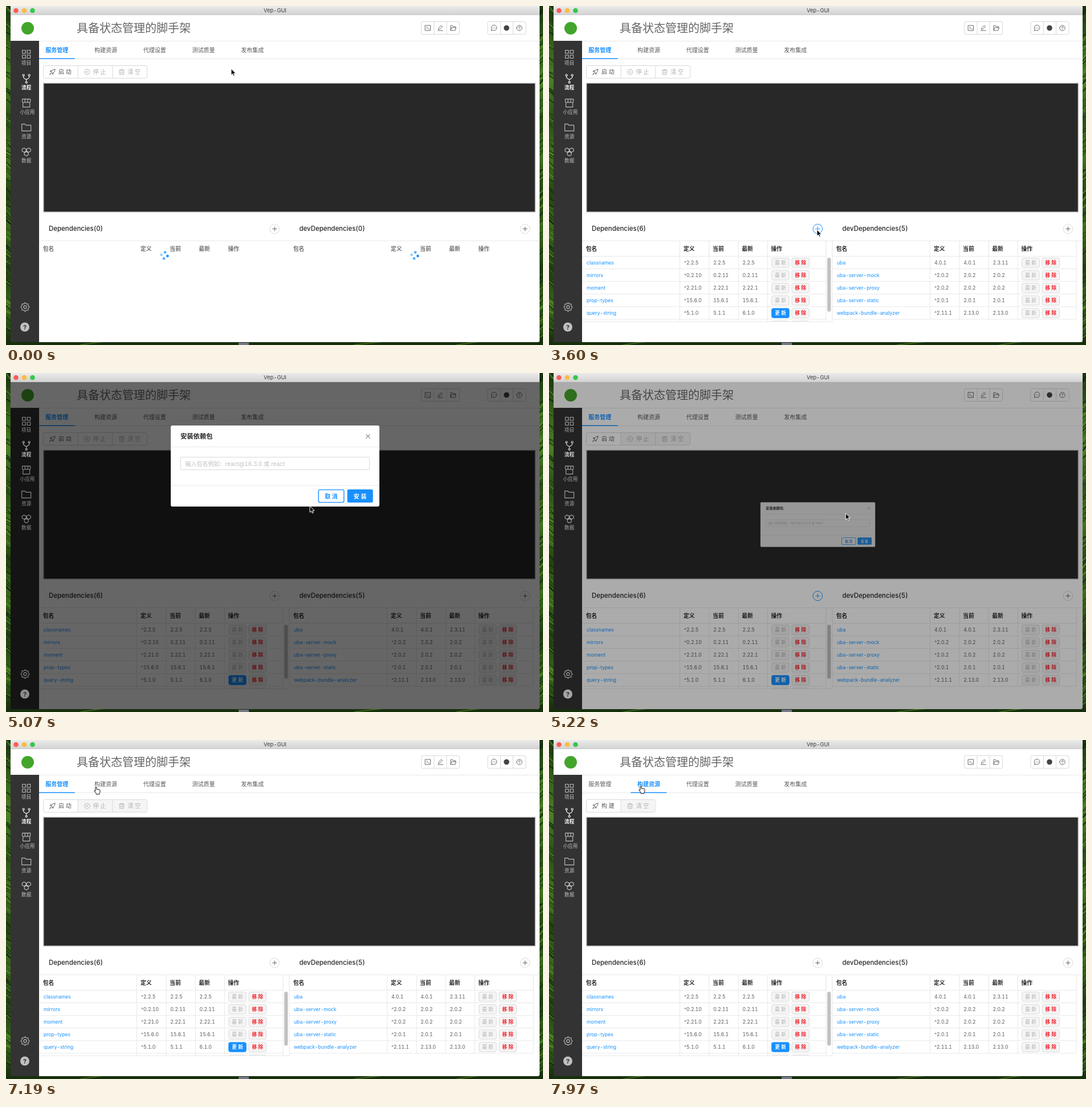
Animation of 942 by 594 pixels, one loop 8 s. Source, as an HTML page:

```html
<!DOCTYPE html>
<html lang="zh-CN">
<head>
<meta charset="utf-8">
<title>Vep-GUI</title>
<style>
html, body { margin: 0; width: 100%; height: 100%; overflow: hidden; }
svg { display: block; width: 942px; height: 594px; }
text { font-family: Inter, "Noto Sans CJK SC", "Noto Sans CJK", sans-serif; font-variant-numeric: tabular-nums; white-space: pre; }
</style>
</head>
<body>
<svg id="stage" viewBox="0 0 942 594"></svg>
<script>
const BLUE = '#1890ff', INK = '#262626', BODY = '#595959', FAINT = '#b0b0b0', RULE = '#e8e8e8', EDGE = '#d9d9d9';
const BOLD = 'font-weight="700"';
const LOOP = 8000;

// Drawing helpers; text is placed by its vertical middle.
const text = (x, y, str, size, fill = BODY, extra = '') =>
  `<text x="${x}" y="${y + size * 0.37}" font-size="${size}" fill="${fill}" ${extra}>${str}</text>`;
const centred = (x, y, str, size, fill, extra = '') => text(x, y, str, size, fill, `text-anchor="middle" ${extra}`);
const rect = (x, y, w, h, fill, extra = '') => `<rect x="${x}" y="${y}" width="${w}" height="${h}" fill="${fill}" ${extra}/>`;
const box = (x, y, w, h, fill, stroke = EDGE, r = 2.5) => rect(x, y, w, h, fill, `stroke="${stroke}" rx="${r}"`);
const path = (d, stroke = RULE, width = 1, extra = '') =>
  `<path d="${d}" fill="none" stroke="${stroke}" stroke-width="${width}" ${extra}/>`;
const circle = (x, y, r, fill, extra = '') => `<circle cx="${x}" cy="${y}" r="${r}" fill="${fill}" ${extra}/>`;
const icon = (x, y, d, stroke, width = 1) =>
  path(d, stroke, width, `transform="translate(${x} ${y})" stroke-linejoin="round" stroke-linecap="round"`);
const group = (id, inner, extra = '') => `<g id="${id}" ${extra}>${inner}</g>`;
const ring = r => `M${-r} 0a${r} ${r} 0 1 0 ${2 * r} 0a${r} ${r} 0 1 0 ${-2 * r} 0`;

const ICONS = {
  grid: 'M-7-7h5.5v5.5h-5.5zM1.5-7H7v5.5H1.5zM-7 1.5h5.5V7H-7zM1.5 1.5H7V7H1.5z',
  fork: 'M-5-4v1.5q0 2 5 4q5-2 5-4V-4M0 1.5V5M-6.6-6a1.6 1.6 0 1 0 3.2 0a1.6 1.6 0 1 0-3.2 0M3.4-6a1.6 1.6 0 1 0 3.2 0a1.6 1.6 0 1 0-3.2 0M-1.6 6.5a1.6 1.6 0 1 0 3.2 0a1.6 1.6 0 1 0-3.2 0',
  shop: 'M-7-7H7v5q-2.3 2.5-4.6 0q-2.4 2.5-4.8 0q-2.3 2.5-4.6 0zM-2.4-7v5M2.4-7v5M-6 0v7H6V0',
  folder: 'M-8 6v-12h5.5l1.7 2H8V6z',
  cells: 'M-4-7l3.5 2v3.5L-4 .5l-3.5-2V-5zM4-7l3.5 2v3.5L4 .5l-3.5-2V-5zM0-.5l3.5 2V5L0 7l-3.5-2V1.5z',
  rocket: 'M4.5-4.5q-5 0-7 4l2.5 3q4.5-2 4.5-7zM-1.5-2l-3 .5 2 1.5M1.5 1.5l-.5 3-1.5-2M-3 2l-1.8 2.8L-2 3.2',
  stop: ring(4.7) + 'M-1.7-1.7l3.4 3.4M1.7-1.7l-3.4 3.4',
  trash: 'M-4.5-3h9M-3.5-3V4.5h7V-3M-1.5-3v-1.5h3V-3M-1.2-.8v3.3M1.2-.8v3.3',
  terminal: 'M-4.5-4.5h9v9h-9zM-2.2-1.8l1.7 1.5-1.7 1.5M.6 1.8h1.8',
  pencil: 'M-3.5 2l.5-2 4.5-4.5 2 2L-1 2zM-4.5 4.5h9',
  open: 'M-4.5 4v-8h3.2l1 1.5h4V-.5M-4.5 4l1.7-4.5H5L3.6 4z',
  chat: 'M-4.5 4.5l.5-2.3a4.8 4.8 0 1 1 1.8 1.7zM-2 0h.2M0 0h.2M2 0h.2',
  help: ring(4.7) + 'M-1.4-1q0-1.6 1.5-1.6t1.5 1.4Q1.6-.3 0 .7M0 2.5v.2',
  plus: 'M-3.6 0h7.2M0-3.6v7.2'
};

// A grassy field, seen only as narrow strips around the window.
const wallpaper = () => {
  const stops = ['#1c330f', '#33601a', '#4b7f26', '#2a4d15', '#41751f', '#23420f', '#3b6b1c', '#1f3b10', '#39691a', '#142a0a']
    .map((c, i, all) => `<stop offset="${i / (all.length - 1)}" stop-color="${c}"/>`).join('');
  let seed = 7;
  const random = () => (seed = seed * 16807 % 2147483647) / 2147483647;
  const greens = ['#10200a', '#1b3410', '#5a9430', '#2c5518'];
  let blades = '';
  for (let i = 0; i < 240; i++) {
    const x = i % 2 ? 936 : 0, y = random() * 590;
    blades += path(`M${x} ${y}l8 ${(x ? -1 : 1) * (3 + 7 * random())}`, greens[i % 7 % 4], .5 + random());
  }
  return `<defs><linearGradient id="grass" x2="0" y2="1">${stops}</linearGradient>
    <linearGradient id="bar" x2="0" y2="1"><stop stop-color="#ebebeb"/><stop offset="1" stop-color="#d2d2d2"/></linearGradient>
    <clipPath id="paneClip">${rect(58, 94, 878, 268)}</clipPath>
    <clipPath id="bodyClip">${rect(58, 411, 878, 142)}</clipPath></defs>`
    + rect(0, 0, 942, 594, 'url(#grass)') + blades + rect(0, 588, 942, 6, '#17300c')
    + path('M408 592h18', '#77778a', 4) + path('M130 594l40-6M610 594l50-6M790 594l40-6', '#37641a', 2);
};

const iconGroup = (x, inner) => box(x, 27.5, 67, 22, '#fff') + path(`M${x + 22.5} 28v21M${x + 44.5} 28v21`, EDGE) + inner;

const chrome = () => rect(8, 10, 928, 579, '#fff', 'rx="3"')
  + rect(8, 0, 928, 15.5, 'url(#bar)') + path('M8 15.5H936', '#bdbdbd', .7)
  + circle(17.5, 8, 4.3, '#fc5b57') + circle(32, 8, 4.3, '#fdbc40') + circle(46.5, 8, 4.3, '#34c84a')
  + centred(472, 8, 'Vep-GUI', 9.4, '#3c3c3c')
  + circle(38, 39, 11, '#43a52b')
  + text(124, 38.5, '具备状态管理的脚手架', 20, '#666', 'font-weight="100"')
  + iconGroup(728.5, icon(740, 38.5, ICONS.terminal, BODY, .9) + icon(762, 38.5, ICONS.pencil, BODY, .9) + icon(784.5, 38.5, ICONS.open, BODY, .9))
  + iconGroup(845, icon(856, 38.5, ICONS.chat, BODY, .9) + circle(878, 38.5, 4.8, '#444') + icon(900.5, 38.5, ICONS.help, BODY, .9))
  + path('M58 61.5H936M58 92.5H936') + rect(8, 61, 50, 528, '#333');

const sidebarItems = () => {
  const items = [['grid', '项目'], ['fork', '流程'], ['shop', '小应用'], ['folder', '资源'], ['cells', '数据']];
  let gear = '';
  for (let i = 0; i <= 16; i++) {
    const a = i * Math.PI / 8, r = i % 2 ? 6 : 7.6;
    gear += `${i ? 'L' : 'M'}${(r * Math.cos(a)).toFixed(1)} ${(r * Math.sin(a)).toFixed(1)}`;
  }
  return group('sidebar', items.map(([name, label], i) => {
    const on = i === 1, colour = on ? '#fff' : '#c0c0c0', y = 84.5 + i * 42.8;
    return icon(35.7, y, ICONS[name], colour, 1.1)
      + centred(label.length > 2 ? 37.5 : 35.7, y + 15.5, label, 8.6, colour, on ? BOLD : '');
  }).join('') + icon(33.5, 527.5, gear + ring(2.6), '#c0c0c0', 1.1)
    + circle(33, 562.5, 8, '#c0c0c0') + centred(33, 562.5, '?', 11, '#333', BOLD));
};

const TABS = ['服务管理', '构建资源', '代理设置', '测试质量', '发布集成'];
const tabs = () => TABS.map((label, i) => centred(89.2 + i * 85.75, 77.5, label, 10, BODY, `id="tab${i}"`)).join('')
  + rect(58, 91.5, 62.8, 1.5, BLUE, 'id="inkBar"');

const pane = (x, buttons, terminalFill) => {
  const width = buttons.length * 60.7;
  const parts = buttons.map(([name, label], i) => {
    const left = 65.5 + i * 60.7, colour = i ? FAINT : BODY;
    return icon(left + 16, 115.5, ICONS[name], colour, .9) + text(left + 26.5, 115.5, label, 10, colour)
      + (i ? path(`M${left} 104.5v22`, EDGE) : '');
  }).join('');
  return `<g transform="translate(${x})">` + box(65.5, 104.5, width, 22, '#fff')
    + rect(126.5, 105, width - 61.5, 21, '#f5f5f5', 'class="disabledFill"') + parts
    + rect(65.8, 135.2, 862.6, 225.8, terminalFill, 'stroke="#c4c4c4" stroke-width="1.4"') + '</g>';
};
const panes = () => `<g clip-path="url(#paneClip)">` + group('slider',
  pane(0, [['rocket', '启 动'], ['stop', '停 止'], ['trash', '清 空']], '#282828')
  + pane(878, [['rocket', '构 建'], ['trash', '清 空']], '#2b2b2b')) + '</g>';

const LEFT = [
  ['classnames', '^2.2.5', '2.2.5', '2.2.5'], ['mirrorx', '^0.2.10', '0.2.11', '0.2.11'],
  ['moment', '^2.21.0', '2.22.1', '2.22.1'], ['prop-types', '^15.6.0', '15.6.1', '15.6.1'],
  ['query-string', '^5.1.0', '5.1.1', '6.1.0'], ['']
];
const RIGHT = [
  ['uba', '4.0.1', '4.0.1', '2.3.11'], ['uba-server-mock', '^2.0.2', '2.0.2', '2.0.2'],
  ['uba-server-proxy', '^2.0.2', '2.0.2', '2.0.2'], ['uba-server-static', '^2.0.1', '2.0.1', '2.0.1'],
  ['webpack-bundle-analyzer', '^2.11.1', '2.13.0', '2.13.0']
];

const tableRows = (x, rows) => rows.map(([name, ...versions], i) => {
  const y = 449.8 + i * 22.1, update = name === 'query-string';
  return text(x + 8, y, name, 8.58, BLUE)
    + versions.map((v, k) => text(x + 179 + k * 51.3, y, v, 8.58)).join('')
    + box(x + 332.7, y - 8.3, 30.5, 16.4, update ? BLUE : '#f5f5f5', update ? BLUE : EDGE)
    + centred(x + 348, y, update ? '更 新' : '最 新', 8.58, update ? '#fff' : FAINT, update ? BOLD : '')
    + box(x + 368, y - 8.3, 30.5, 16.4, '#f5f5f5')
    + centred(x + 383.3, y, '移 除', 8.58, '#f5222d', BOLD)
    + path(`M${x} ${y + 10.7}h428`);
}).join('');

const tableLines = (x, bottom) => path([229.5, 281, 332.3, 383.3, 486].map(c => `M${x + c - 58} 412V${bottom}`).join(''))
  + path(`M${x} 438.5h428`);
const tableHead = x => ['包名', '定义', '当前', '最新', '操作']
  .map((h, i) => text(x + (i ? 126.7 + i * 51.2 : 6.8), 425.7, h, 9.8, INK, BOLD)).join('');
const addButton = (x, id) => group(id, path(ring(8.3), EDGE, 1, 'class="rim"') + icon(0, 0, ICONS.plus, BODY, .9),
  `transform="translate(${x} 390.5)"`);

const tables = () => text(75, 389.5, '', 11.44, INK, 'id="depTitle" font-weight="500"')
  + text(514.5, 389.5, '', 11.44, INK, 'id="devTitle" font-weight="500"')
  + addButton(471.3, 'addDep') + addButton(910.5, 'addDev')
  + path('M58 411.5H936') + group('heads', tableHead(58) + tableHead(497))
  + group('lines', tableLines(58, 439) + tableLines(497, 439) + path('M497 412v27'), 'opacity=".35"')
  + group('rows', `<g clip-path="url(#bodyClip)">${tableRows(58, LEFT)}${tableLines(58, 553)}</g>`
    + tableRows(497, RIGHT) + tableLines(497, 549) + path('M58 553.2H497M497 412V553')
    + rect(488.2, 441, 6.2, 94.5, '#c1c1c1', 'rx="3.1"'))
  + group('spinners', [278, 717].map(x => `<g transform="translate(${x} 437)">`
    + [0, 1, 2, 3].map(() => circle(0, 0, 2.4, BLUE, 'class="dot"')).join('') + '</g>').join(''));

const modal = () => group('modal',
  rect(289, 92, 366, 142, '#fff', 'rx="3"') + path('M289 129.5h366M289 197h366')
  + text(306, 111, '安装依赖包', 11.3, INK, BOLD)
  + path('M631.5 107.5l7 7M638.5 107.5l-7 7', '#8c8c8c', 1.1)
  + box(306.5, 147.5, 331, 22, '#fff') + text(314.5, 159, '输入包名例如：react@16.3.0 或 react', 10, '#bfbfbf')
  + rect(548.2, 204.6, 44.6, 22, '#fff', 'id="cancelBox" stroke-width="1.4" rx="2.5"')
  + centred(570.5, 215.8, '取 消', 10, BODY, `id="cancelText" ${BOLD}`)
  + rect(598.7, 204, 45, 23, BLUE, 'rx="2.5"') + centred(621.2, 215.8, '安 装', 10, '#fff', BOLD));

const pointer = () => group('cursor',
  `<path id="arrow" d="M0 0V11.2L2.6 8.8L4.3 12.6L6.2 11.8L4.5 8.1H8z" fill="#000" stroke="#fff" stroke-width="1"/>
   <path id="hand" d="M-1.2 1q1-2 2.2 0V4.6q1-1 2 .2q1-.8 2 .3q1.6-.6 2 1V9q-.3 1.6-1 2.5V13H.2V11.5L-3.2 7.4q.2-1.6 2 0z" fill="#fff" stroke="#111" stroke-width="1"/>`);

document.getElementById('stage').innerHTML = wallpaper() + chrome() + tabs() + panes() + tables()
  + rect(8, 16, 928, 573, '#000', 'id="mask"') + sidebarItems() + modal() + pointer();

const $ = id => document.getElementById(id);
const set = (el, attrs) => { for (const k in attrs) el.setAttribute(k, attrs[k]); };
const show = (id, visible) => $(id).setAttribute('visibility', visible ? 'visible' : 'hidden');
const ramp = (t, from, to) => Math.min(1, Math.max(0, (t - from) / (to - from)));
const ease = p => p * p * (3 - 2 * p);

// Pictures come in bursts of evenly spaced steps: [start, end, count].
const BURSTS = [[150, 1080, 7], [1230, 2120, 7], [2720, 3740, 8], [3890, 4930, 7],
  [5070, 5220, 2], [5460, 6020, 4], [6170, 7190, 8], [7340, 7970, 5]];
const MOMENTS = [0, ...BURSTS.flatMap(([a, b, n]) => Array.from({ length: n }, (_, i) => a + (b - a) * i / (n - 1)))];

// Cursor tip: [time, x, y].
const TRACK = [[0, 395, 110], [2720, 395, 110], [3590, 470, 392], [4000, 470, 392], [4780, 568, 218], [4930, 568, 218],
  [5070, 533, 233], [5450, 496, 270], [6020, 400, 215], [6600, 84, 96], [6900, 95, 84], [7190, 158, 82], [7500, 161, 80.5], [LOOP, 161, 80.5]];
const cursorAt = t => {
  const i = TRACK.findIndex(k => k[0] > t), [t0, x0, y0] = TRACK[i - 1], [t1, x1, y1] = TRACK[i];
  const p = ease(ramp(t, t0, t1));
  return [x0 + (x1 - x0) * p, y0 + (y1 - y0) * p];
};

function spin(t) {
  document.querySelectorAll('.dot').forEach((dot, i) => {
    const k = i % 4, angle = (281 + 0.3083 * t + 90 * k) * Math.PI / 180;
    const phase = (t / 1000 + 3.4 - 0.4 * k) % 2;
    set(dot, { cx: 5.5 * Math.cos(angle), cy: 5.5 * Math.sin(angle), opacity: 0.3 + 0.7 * (1 - Math.abs(1 - phase)) });
  });
}

function draw(t) {
  const loaded = t > 1700, fade = ramp(t, 1680, 1980);
  spin(t);
  show('spinners', !loaded);
  show('lines', t > 1650);
  set($('heads'), { opacity: .65 + .35 * fade });
  set($('rows'), { opacity: fade });
  $('depTitle').textContent = `Dependencies(${loaded ? 6 : 0})`;
  $('devTitle').textContent = `devDependencies(${loaded ? 5 : 0})`;
  const addActive = (t > 3400 && t < 4100) || (t > 5200 && t < 6700);
  const [rim, plus] = $('addDep').children;
  set(rim, { stroke: addActive ? BLUE : EDGE });
  set(plus, { stroke: addActive ? BLUE : BODY });
  document.querySelectorAll('.disabledFill').forEach(el => set(el, { opacity: t > 5100 ? 1 : 0 }));

  // The dialog grows out of the add button and shrinks back into it.
  const open = ease(ramp(t, 3660, 3960)) * (1 - ease(ramp(t, 5080, 5380)));
  set($('mask'), { opacity: .6 * open });
  set($('sidebar'), { opacity: 1 - .3 * open });
  set($('modal'), { opacity: open, transform: `translate(${471 * (1 - open)} ${391 * (1 - open)}) scale(${open})` });
  const cancelHot = t > 4600;
  set($('cancelBox'), { stroke: cancelHot ? BLUE : EDGE });
  set($('cancelText'), { fill: cancelHot ? BLUE : BODY });

  const slide = ease(ramp(t, 7490, 7800)), active = t > 7495 ? 1 : 0;
  set($('slider'), { transform: `translate(${-878 * slide})` });
  set($('inkBar'), { x: 58 + 85.5 * slide });
  TABS.forEach((_, i) => set($('tab' + i), { fill: i === active ? BLUE : BODY, 'font-weight': i === active ? 700 : 400 }));

  const [x, y] = cursorAt(t), overTab = y < 92;
  set($('cursor'), { transform: `translate(${x} ${y})` });
  show('hand', overTab);
  show('arrow', !overTab);
}

const started = performance.now();
function tick() {
  const t = (performance.now() - started) % LOOP;
  draw(MOMENTS.findLast(m => m <= t));
  requestAnimationFrame(tick);
}
tick();
</script>
</body>
</html>
```
